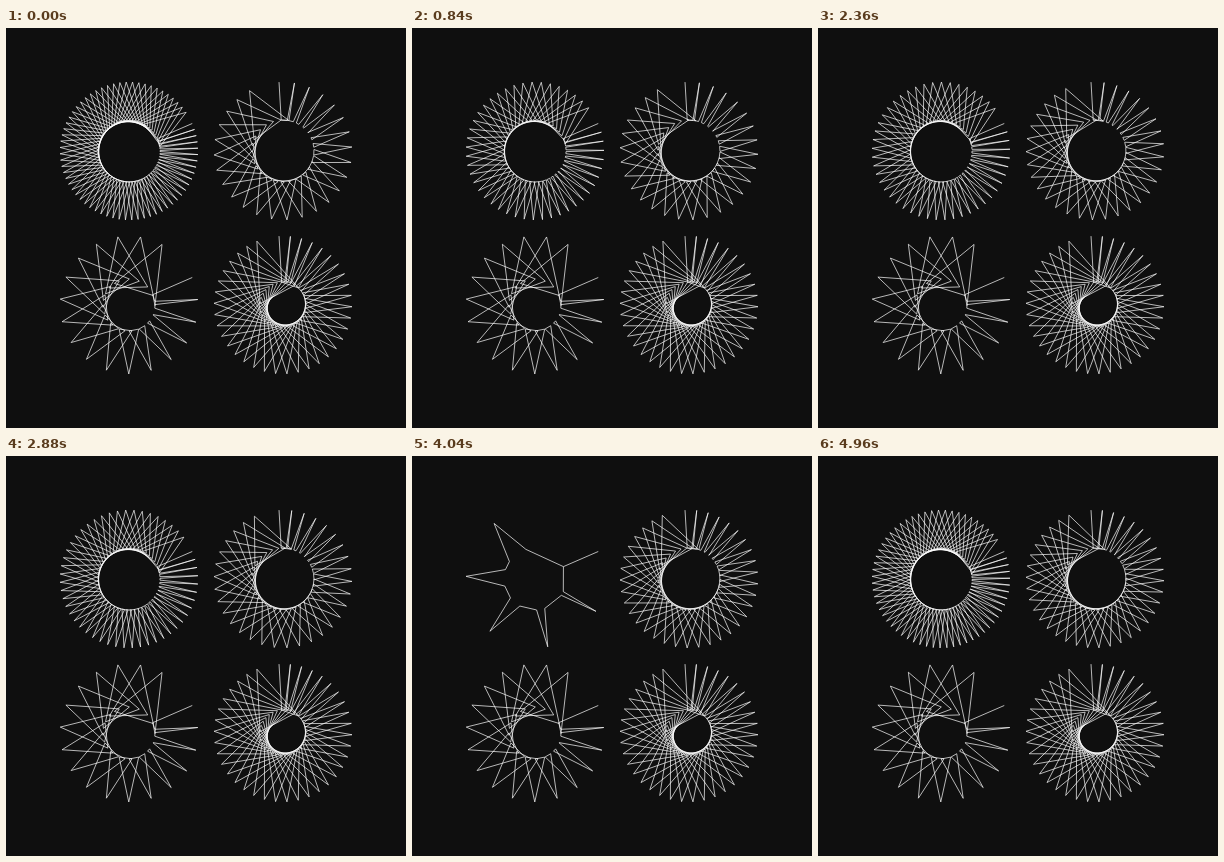
These frames come from a looping animation (400 px wide and 400 px high, 5 s). An HTML page with a canvas:

```html
<!DOCTYPE html>
<html>
<head>
<meta charset="utf-8">
<style>
html, body { margin: 0; width: 100%; height: 100%; overflow: hidden; background: #0f0f0f; }
canvas { display: block; }
</style>
</head>
<body>
<canvas id="stage" width="400" height="400"></canvas>
<script>
const ctx = document.getElementById('stage').getContext('2d');
const LOOP = 5000, STEP = 40, OUTER = 69;
const rad = deg => deg * Math.PI / 180;

// Spikes whose bases widen steadily on the way round
function star(cx, cy, start, count, inner, spread) {
  const turn = 360 / (count + 1);
  const vertex = (r, deg) => ctx.lineTo(cx + r * Math.cos(rad(deg)), cy + r * Math.sin(rad(deg)));
  ctx.beginPath();
  for (let i = 0; i < count; i++) {
    const tip = start + i * turn, half = spread * i / (count + 1);
    if (i) vertex(inner, tip - half);
    vertex(OUTER, tip);
    vertex(inner, tip + half);
  }
  vertex(inner, start);
  ctx.stroke();
}

function draw(now) {
  const step = Math.floor(now % LOOP / STEP);
  const clock = step * 80 + 998;
  const seconds = 27 + Math.floor(clock / 1000);
  const pulse = Math.ceil(clock % 1000 / 15);
  ctx.fillStyle = '#0f0f0f';
  ctx.fillRect(0, 0, 400, 400);
  ctx.strokeStyle = '#fff';
  ctx.lineWidth = 0.7;
  ctx.lineJoin = 'bevel';
  star(123, 123, -23.5, pulse, 31, 27);
  star(277, 123, -93.3, seconds, 31, 43);
  star(123, 277, -23.5, 18, 26, 70);
  star(277, 277, -93.3, 37, 23, 68);
  requestAnimationFrame(draw);
}
requestAnimationFrame(draw);
</script>
</body>
</html>
```
